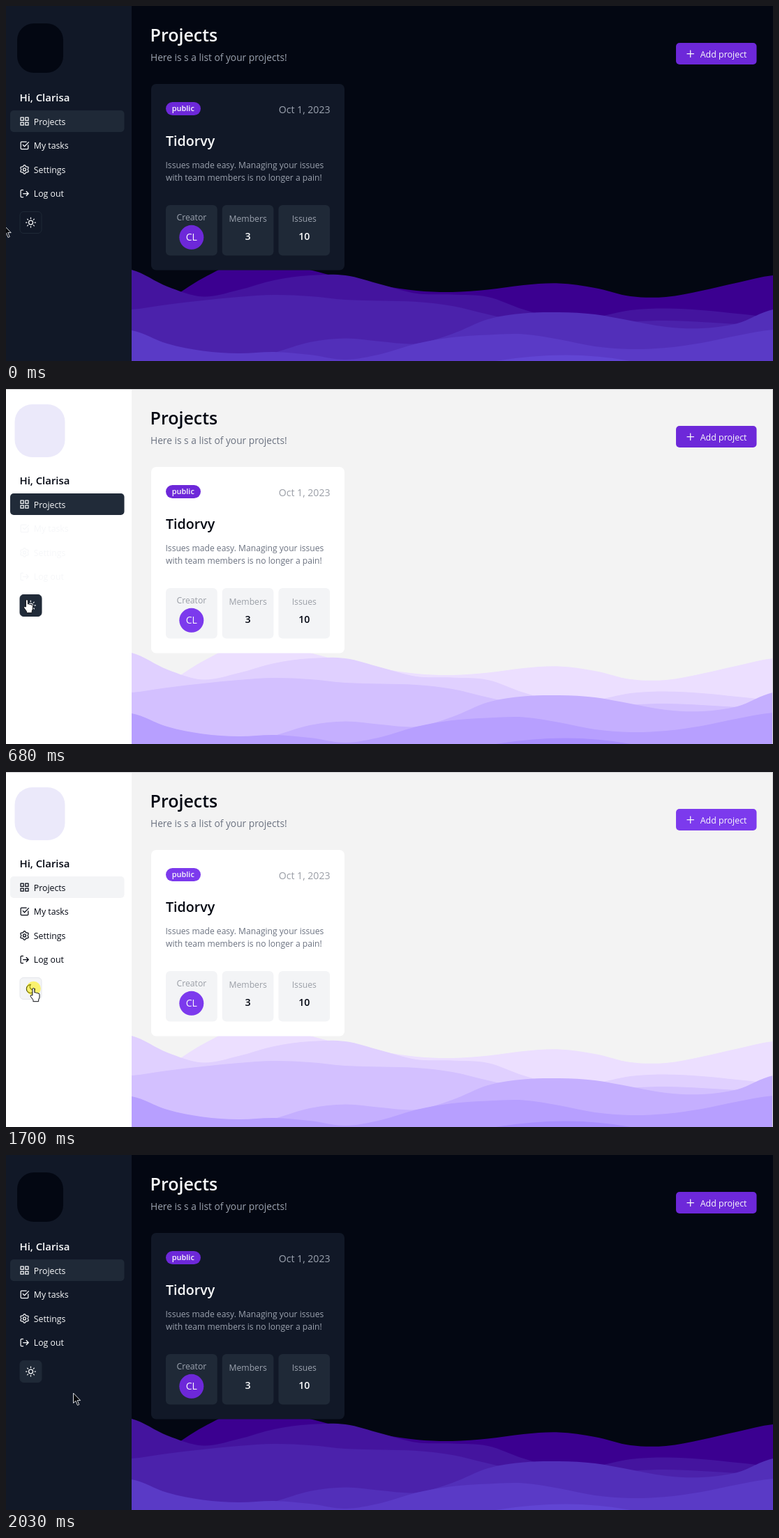
An HTML page with a canvas for the animation above (2.09 s loop, 1099 by 510 pixels).

```html
<!DOCTYPE html>
<html lang="en">
<head>
<meta charset="utf-8">
<title>Project dashboard</title>
<style>
  html, body { margin: 0; width: 100%; height: 100%; overflow: hidden; background: #030712; }
  canvas { display: block; width: 1099px; height: 510px; }
</style>
</head>
<body>
<canvas id="stage" width="1099" height="510"></canvas>
<script>
const W = 1099, H = 510, LOOP = 2090, SIDE = 180;
const ctx = document.getElementById('stage').getContext('2d');
const FONT = '"Open Sans", "Noto Sans", sans-serif';

// The screen refreshes only at these times (ms)
const TICKS = [0, 70, 140, 200, 270, 340, 410, 610, 680, 740, 810, 880, 950,
  1700, 1770, 1830, 1900, 1970, 2030];
const TO_LIGHT = 680, TO_DARK = 1770, FADE = 150;

const THEMES = {
  dark: {
    side: '#111827', main: '#030712', card: '#111827', stat: '#1f2937', logo: '#030712',
    text: '#f9fafb', muted: '#9ca3af', soft: '#9ca3af', avatar: '#6d28d9',
    waves: ['#3b0090', '#44149e', '#4b22ab', '#522fb9', '#5a3ac6', '#6145d3']
  },
  light: {
    side: '#ffffff', main: '#f3f3f3', card: '#ffffff', stat: '#f3f4f6', logo: '#ebe9fa',
    text: '#030712', muted: '#6b7280', soft: '#9a9ea6', avatar: '#7c3aed',
    waves: ['#ecdfff', '#e0d0ff', '#d3c0ff', '#c5afff', '#b79fff', '#a98fff']
  }
};

// Crest heights at even steps across the main area
const CRESTS = [
  [440, 422, 391, 368, 366, 379, 392, 401.5, 409, 411, 407.5, 401, 398.5, 405, 417, 418, 409, 397.5, 387],
  [379, 403, 417.5, 408, 394, 387, 387, 400, 413, 414.5, 418, 436, 449, 447, 437, 434.5, 437, 442, 447],
  [436, 429, 423, 418, 415, 417, 422, 423.5, 425, 431, 443, 454, 460, 460, 454, 452, 454, 457, 458],
  [530, 530, 520, 509, 498, 483, 477.5, 482, 485, 471, 450, 441.5, 440, 443, 452, 461, 463, 456, 436],
  [466, 485, 495.5, 499, 497, 501, 508, 500, 485, 476, 472.5, 471.5, 479, 489, 493, 491, 484, 473.5, 465]
];

const clamp = v => Math.max(0, Math.min(1, v));
const smooth = v => { v = clamp(v); return v * v * (3 - 2 * v); };
const lerp = (a, b, u) => a + (b - a) * u;

// cubic-bezier(.4, 0, .2, 1)
function ease(x) {
  x = clamp(x);
  let lo = 0, hi = 1;
  for (let i = 0; i < 20; i++) {
    const s = (lo + hi) / 2, r = 1 - s;
    if (3 * r * r * s * 0.4 + 3 * r * s * s * 0.2 + s * s * s < x) lo = s; else hi = s;
  }
  return lo * lo * (3 - 2 * lo);
}

function mix(a, b, u) {
  const part = (c, i) => parseInt(c.substr(1 + 2 * i, 2), 16);
  return `rgb(${[0, 1, 2].map(i => Math.round(lerp(part(a, i), part(b, i), u)))})`;
}

function box(x, y, w, h, r, fill, stroke) {
  ctx.beginPath();
  ctx.roundRect(x, y, w, h, r);
  ctx.fillStyle = fill;
  ctx.fill();
  if (stroke) {
    ctx.strokeStyle = stroke;
    ctx.lineWidth = 1;
    ctx.stroke();
  }
}

function disc(x, y, r, fill) {
  ctx.beginPath();
  ctx.arc(x, y, r, 0, 7);
  ctx.fillStyle = fill;
  ctx.fill();
}

function text(str, x, y, size, color, weight = 400, align = 'left') {
  ctx.font = `${weight} ${size}px ${FONT}`;
  ctx.textAlign = align;
  ctx.fillStyle = color;
  ctx.fillText(str, x, y);
}

// Line icons, drawn around their own centre
function gearPath() {
  const p = new Path2D();
  for (let i = 0; i < 72; i++) {
    const a = i * Math.PI / 36, r = 5.5 + 0.8 * Math.cos(6 * a);
    p.lineTo(r * Math.sin(a), -r * Math.cos(a));
  }
  p.closePath();
  p.moveTo(2, 0);
  p.arc(0, 0, 2, 0, 7);
  return p;
}

function sunPath() {
  const p = new Path2D();
  p.arc(0, 0, 3, 0, 7);
  for (let i = 0; i < 8; i++) {
    const a = i * Math.PI / 4, c = Math.cos(a), s = Math.sin(a);
    p.moveTo(5.5 * c, 5.5 * s);
    p.lineTo(6.9 * c, 6.9 * s);
  }
  return p;
}

const ICONS = {
  grid: new Path2D('M-5.5-5.5h4.2v4.2h-4.2zM1.3-5.5h4.2v4.2h-4.2zM-5.5 1.3h4.2v4.2h-4.2zM1.3 1.3h4.2v4.2h-4.2z'),
  check: new Path2D('M5.3-.5V4.3a1 1 0 0 1-1 1H-4.3a1 1 0 0 1-1-1V-4.3a1 1 0 0 1 1-1H2.7M-2.3-.9L0 1.5L6-4.7'),
  gear: gearPath(),
  exit: new Path2D('M-2-5.2H-4.2a1.2 1.2 0 0 0-1.2 1.2V4a1.2 1.2 0 0 0 1.2 1.2H-2M-1.8 0H5.6M2.7-3L5.7 0L2.7 3'),
  plus: new Path2D('M-4.7 0H4.7M0-4.7V4.7'),
  sun: sunPath(),
  moon: new Path2D('M0-6.1A4.1 4.1 0 0 0 6.1 0A6.1 6.1 0 1 1 0-6.1Z')
};
const ARROW = new Path2D('M0 0V14.4L3.4 11.3L6 17.5L8.3 16.5L5.7 10.6H10.2Z');
const HAND = new Path2D('M-1.6 10V1.1a1.5 1.5 0 0 1 3 0V6q1.5-.9 2.6.5q1.4-.8 2.4.6q2-.5 2.1 1.5V13L7.2 16V18.7H-.6V16.4L-4.2 11.6q-.7-2 .9-2.1Z');

function icon(name, x, y, color, scale = 1, turn = 0) {
  if (scale < 0.01) return;
  ctx.save();
  ctx.translate(x, y);
  ctx.rotate(turn);
  ctx.scale(scale, scale);
  ctx.strokeStyle = color;
  ctx.lineWidth = 1.25;
  ctx.lineCap = ctx.lineJoin = 'round';
  ctx.stroke(ICONS[name]);
  ctx.restore();
}

function pointer(shape, x, y, fill, line) {
  ctx.save();
  ctx.translate(x, y);
  ctx.fillStyle = fill;
  ctx.strokeStyle = line;
  ctx.lineWidth = 1;
  ctx.lineJoin = 'round';
  ctx.fill(shape);
  ctx.stroke(shape);
  ctx.restore();
}

function drawWaves(colors) {
  const gap = (W - SIDE) / (CRESTS[0].length - 1);
  CRESTS.forEach((ys, n) => {
    const at = i => ys[Math.max(0, Math.min(ys.length - 1, i))];
    ctx.beginPath();
    ctx.moveTo(SIDE, H);
    ctx.lineTo(SIDE, ys[0]);
    for (let i = 0; i < ys.length - 1; i++) {
      const x = SIDE + i * gap;
      ctx.bezierCurveTo(x + gap / 3, at(i) + (at(i + 1) - at(i - 1)) / 6,
        x + gap * 2 / 3, at(i + 1) - (at(i + 2) - at(i)) / 6, x + gap, at(i + 1));
    }
    ctx.lineTo(W, H);
    ctx.fillStyle = colors[n];
    ctx.fill();
  });
  ctx.beginPath();
  ctx.moveTo(690, 512);
  ctx.quadraticCurveTo(805, 491, 905, 512);
  ctx.fillStyle = colors[5];
  ctx.fill();
}

function drawSidebar(c, dark, p, hover) {
  const ink = mix('#f9fafb', '#030712', p);
  const accent = mix('#1f2937', '#f3f4f6', p);
  ctx.fillStyle = c.side;
  ctx.fillRect(0, 0, SIDE, H);
  if (dark) box(16, 25, 66, 71, 24, c.logo);
  else box(12.5, 22, 72, 76, 25, c.logo);
  text('Hi, Clarisa', 19.5, 136.5, 14.9, c.text, 600);

  box(6, 150, 163.5, 31, 5, accent);
  const items = [['Projects', 'grid'], ['My tasks', 'check'], ['Settings', 'gear'], ['Log out', 'exit']];
  items.forEach(([label, name], i) => {
    const y = 165.7 + i * 34.6;
    icon(name, 26.5, y, ink);
    text(label, 39.8, y + 4.8, 12.3, ink);
  });

  box(20, 295.5, 31, 31, 5, hover ? accent : c.side, mix('#1f2937', '#e5e7eb', p));
  icon('sun', 35.5, 311, ink, 1 - p, -p * Math.PI / 2);
  icon('moon', 35.5, 311.5, ink, p, (1 - p) * Math.PI / 2);
}

function drawMain(c, dark, p) {
  const violet = mix('#6d28d9', '#7c3aed', p);
  ctx.fillStyle = c.main;
  ctx.fillRect(SIDE, 0, W - SIDE, H);
  drawWaves(c.waves);

  text('Projects', 206.5, 50.7, 25, c.text, 600);
  text('Here is s a list of your projects!', 207, 79, 13.75, c.muted);
  box(960, 53, 115.5, 31, 5, violet);
  icon('plus', 980.7, 68.7, '#f9fafb');
  text('Add project', 994.7, 73.5, 12.45, '#f9fafb');

  box(208, 112, 277, 267.5, 7, c.card);
  box(229, 138, 50, 19, 9.5, violet);
  text('public', 253.8, 151.3, 10.9, '#f9fafb', 600, 'center');
  text('Oct 1, 2023', 464.5, 154, 14.1, c.soft, 400, 'right');
  text('Tidorvy', 229, 201, 19.6, c.text, 600);
  text('Issues made easy. Managing your issues', 228.5, 233.3, 12.1, c.muted);
  text('with team members is no longer a pain!', 229, 250.6, 12.1, c.muted);

  [['Creator', ''], ['Members', '3'], ['Issues', '10']].forEach(([label, value], i) => {
    const x = 229 + i * 80.7;
    box(x, 286, 73.7, 72.5, 6, c.stat);
    text(label, x + 36.9, value ? 309.6 : 307.8, 12.2, c.soft, 400, 'center');
    if (value) text(value, x + 36.9, 336, 14.2, c.text, 600, 'center');
  });
  disc(265.8, 332.3, 17.5, c.avatar);
  text('CL', 265.8, 337.3, 14, '#f9fafb', 500, 'center');

  if (!dark) {
    ctx.fillStyle = '#cfcfd2';
    ctx.fillRect(0, 0, W, 1);
    ctx.fillRect(W - 1, 0, 1, H);
  }
}

function drawPointer(t) {
  let x, y, arrow = false;
  if (t < 610) {
    const u = smooth(t / 410);
    x = lerp(-3, 29.5, u);
    y = lerp(315, 303, u);
    arrow = true;
  } else if (t < TO_DARK) {
    const u = smooth((t - TO_LIGHT) / 270);
    x = lerp(30, 39.5, u);
    y = lerp(303, 311, u);
  } else {
    const u = ((t - TO_DARK) / 260) ** 2;
    x = lerp(39.5, 96.5, u);
    y = lerp(311, 342, u);
    arrow = x > 51;
  }
  if (t === 610) disc(29, 304, 10.3, 'rgba(255,240,0,.55)');
  if (t === 1700) disc(39.5, 311, 10.3, 'rgba(255,240,0,.55)');
  if (arrow) pointer(ARROW, x, y, '#05070c', '#d8dade');
  else pointer(HAND, x, y, '#ffffff', '#0b0d12');
}

function draw(now) {
  const time = now % LOOP;
  const t = TICKS.filter(v => v <= time).pop();
  const dark = t < TO_LIGHT || t >= TO_DARK;
  const fade = from => ease((t - from + 10) / FADE);
  const p = t < TO_LIGHT ? 0 : t < TO_DARK ? fade(TO_LIGHT) : 1 - fade(TO_DARK);
  const c = dark ? THEMES.dark : THEMES.light;
  drawSidebar(c, dark, p, t >= 610);
  drawMain(c, dark, p);
  drawPointer(t);
}

const start = performance.now();
function loop() {
  draw(performance.now() - start);
  requestAnimationFrame(loop);
}
loop();
</script>
</body>
</html>
```
